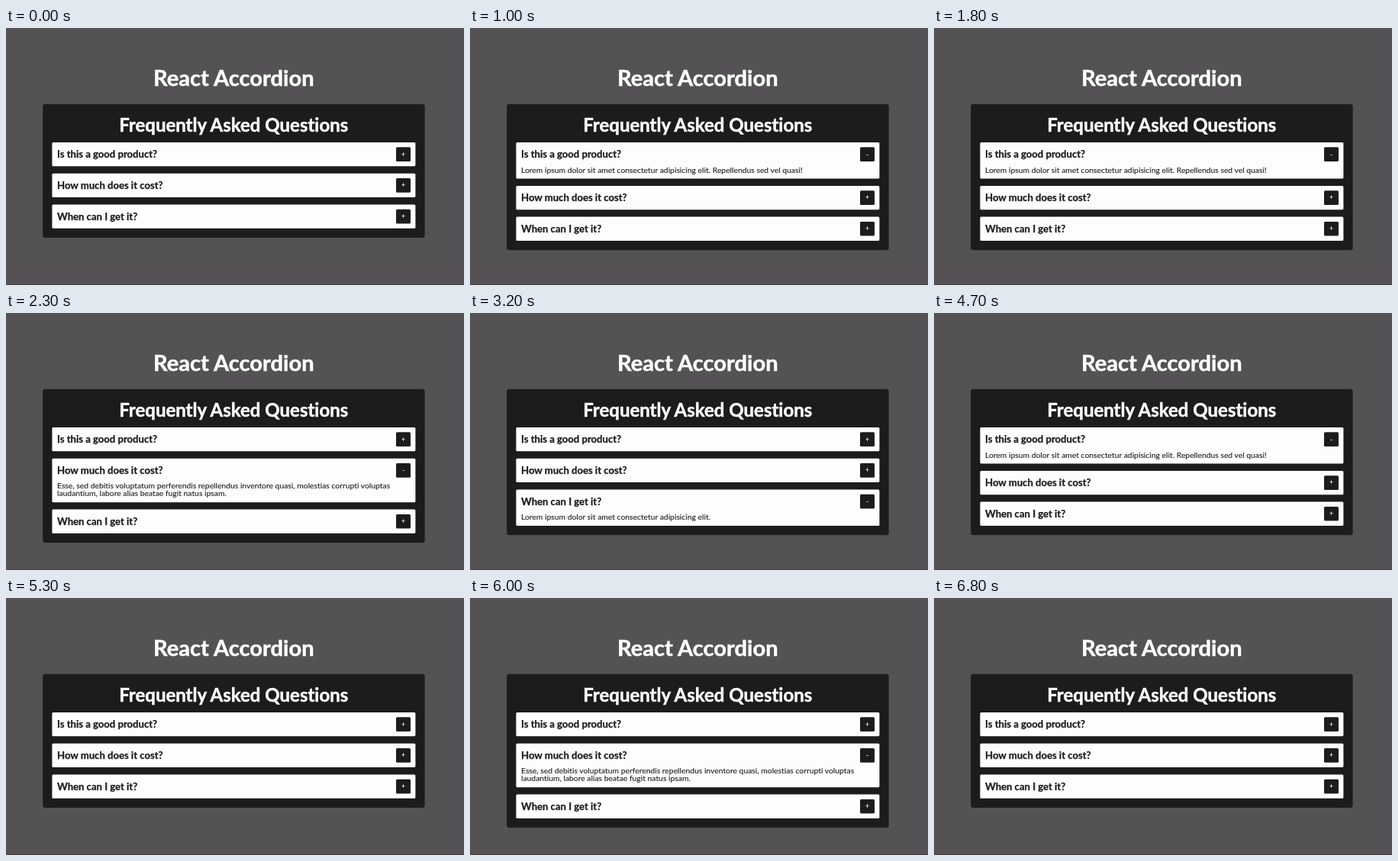
An HTML page for the animation above (7600 ms loop, 600 by 337 pixels).

```html
<!DOCTYPE html>
<html lang="en">
<head>
<meta charset="utf-8">
<title>React Accordion</title>
<style>
  html, body { margin: 0; width: 100%; height: 100%; overflow: hidden; background: #545254; }
  svg { display: block; width: 100vw; height: 100vh; }
  text { font-family: Lato, "Open Sans", sans-serif; font-variant-ligatures: none; }
  .title, .heading { fill: #fff; stroke: #fff; stroke-width: .5px; font-weight: 700; text-anchor: middle; }
  .title { font-size: 29.1px; }
  .heading { font-size: 24px; }
  .panel, .button { fill: #1c1c1c; }
  .card { fill: #fefdfe; }
  .question { fill: #1c1c1c; stroke: #1c1c1c; stroke-width: .25px; font-size: 13.1px; font-weight: 700; }
  .answer { fill: #1c1c1c; stroke: #1c1c1c; stroke-width: .1px; font-size: 10.35px; }
  .sign { fill: #f2dcb8; font-size: 8.5px; font-weight: 700; text-anchor: middle; }
</style>
</head>
<body>
<svg viewBox="0 0 600 337">
  <rect y="336" width="600" height="1" fill="#444344"/>
  <text class="title" x="298.3" y="75.7">React Accordion</text>
  <rect class="panel" id="panel" x="48.2" y="99.8" width="500.4" rx="3"/>
  <text class="heading" x="298.3" y="136">Frequently Asked Questions</text>
  <g id="cards"></g>
</svg>
<script>
const FAQ = [
  ["Is this a good product?",
   "Lorem ipsum dolor sit amet consectetur adipisicing elit. Repellendus sed vel quasi!"],
  ["How much does it cost?",
   "Esse, sed debitis voluptatum perferendis repellendus inventore quasi, molestias corrupti voluptas",
   "laudantium, labore alias beatae fugit natus ipsam."],
  ["When can I get it?",
   "Lorem ipsum dolor sit amet consectetur adipisicing elit."]
];
const LOOP = 7600, NONE = -1;
// [start time, index of the open card]
const STEPS = [[0, NONE], [1000, 0], [2300, 1], [3200, 2], [4700, 0], [5300, NONE], [6000, 1], [6300, NONE]];
const PANEL_TOP = 99.8, TOP = 150, CLOSED = 31.3, GAP = 9.4, LINE = 10;

const panel = document.getElementById("panel");
const cards = document.getElementById("cards");

function card([question, ...lines], y, open) {
  const height = CLOSED + (open ? 6.2 + LINE * lines.length : 0);
  const answer = open ? lines.map((line, i) =>
    `<text class="answer" x="67" y="${39.8 + i * LINE}">${line}</text>`).join("") : "";
  const markup = `<g transform="translate(0 ${y})">
    <rect class="card" x="60.4" width="476" height="${height}" rx="1.5"/>
    <text class="question" x="67" y="20.2">${question}</text>
    <rect class="button" x="511" y="6.3" width="19" height="18.7" rx="1.5"/>
    <text class="sign" x="520.5" y="18.6">${open ? "-" : "+"}</text>${answer}</g>`;
  return { markup, height };
}

function render(openIndex) {
  let y = TOP, markup = "";
  FAQ.forEach((entry, i) => {
    const item = card(entry, y, i === openIndex);
    markup += item.markup;
    y += item.height + GAP;
  });
  cards.innerHTML = markup;
  panel.setAttribute("height", y + 3 - PANEL_TOP);
}

let shown = null;
function frame() {
  const time = performance.now() % LOOP;
  const open = STEPS.findLast(([start]) => start <= time)[1];
  if (open !== shown) render(shown = open);
  requestAnimationFrame(frame);
}
frame();
</script>
</body>
</html>
```
